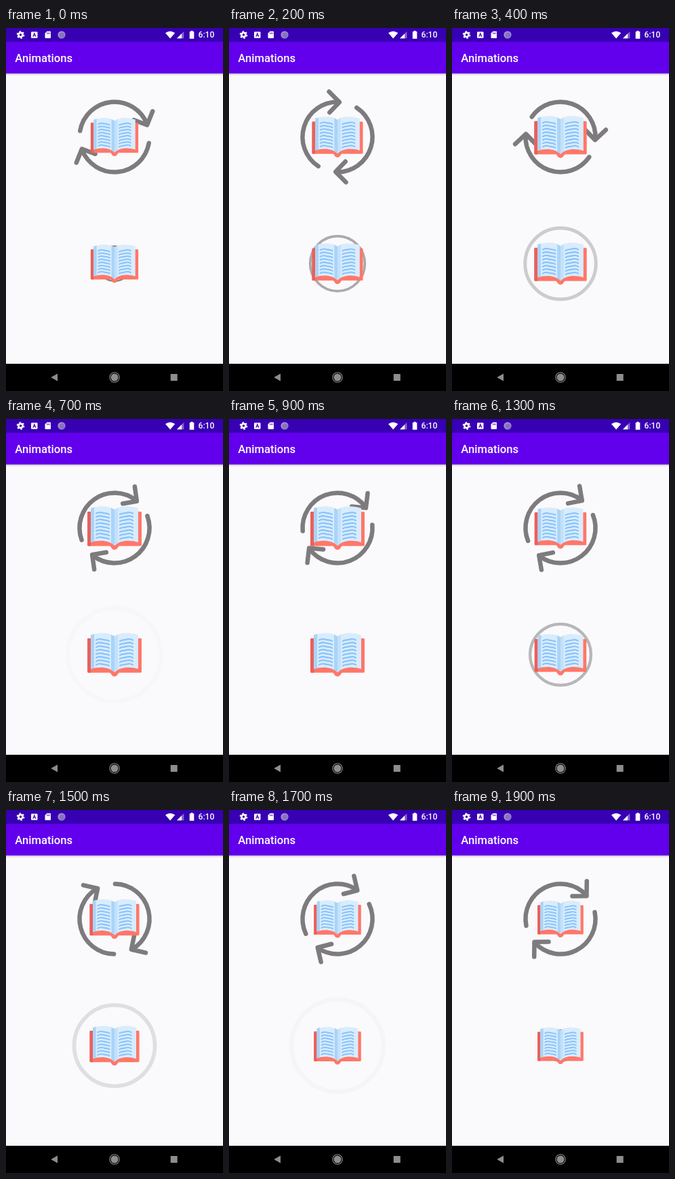
Animation, 320 px wide and 533 px high, one loop 2000 ms. Source, as an HTML page:

```html
<!DOCTYPE html>
<html lang="en">
<head>
<meta charset="utf-8">
<title>Animations</title>
<style>
  html, body { margin: 0; width: 100%; height: 100%; overflow: hidden; background: #faf9fb; }
  svg { display: block; width: 100%; height: 100%; }
  text { font-family: Roboto, sans-serif; font-weight: 500; fill: #fff; }
  .line { fill: none; stroke: #7d7b7e; stroke-linecap: round; stroke-linejoin: round; }
</style>
</head>
<body>
<svg viewBox="0 0 320 533">
  <defs>
    <linearGradient id="shade" x2="0" y2="1">
      <stop stop-color="#bdbbc2"/>
      <stop offset="1" stop-color="#faf9fb"/>
    </linearGradient>
    <g id="arrow" class="line" stroke-width="6.5">
      <path d="M-50.4 10.7A51.5 51.5 0 0 1 37.5 -35.3"/>
      <path d="M38 -56V-34.3L17 -33.8"/>
    </g>
    <g id="book">
      <path fill="#ff7769" d="M-38.5-24H38.5Q40-24 40-22.5V25Q40 26.5 38.5 26.5H7C5 27 4.5 32 0 32S-5 27-7 26.5H-38.5Q-40 26.5-40 25V-22.5Q-40-24-38.5-24Z"/>
      <path fill="#e9605c" d="M-38.5-24H-35V26.5H-38.5Q-40 26.5-40 25V-22.5Q-40-24-38.5-24Z"/>
      <path fill="#d9ecfc" d="M0-27C-8-33-22-33-35-29V21C-22 17-8 18 0 26C8 18 22 17 35 21V-29C22-33 8-33 0-27Z"/>
      <path fill="#a8d4f8" d="M-35-29L-30-30.4V19.6L-35 21ZM0-27L-5-29.6V22L0 26Z"/>
      <path fill="#c3e1fb" d="M0-27L5-29.6V22L0 26Z"/>
      <path id="lines" fill="none" stroke="#87c3fc" stroke-width="2.3" stroke-linecap="round"/>
    </g>
  </defs>

  <rect width="320" height="533" fill="#faf9fb"/>
  <rect y="66" width="320" height="4" fill="url(#shade)"/>
  <rect y="20" width="320" height="46.7" fill="#6200ee"/>
  <rect width="320" height="20.3" fill="#3700b3"/>
  <text x="13.3" y="50" font-size="16.67">Animations</text>

  <g fill="#fff">
    <circle cx="21.5" cy="10" r="3.1" fill="none" stroke="#fff" stroke-width="2.6"/>
    <circle cx="21.5" cy="10" r="4.9" fill="none" stroke="#fff" stroke-width="1.8" stroke-dasharray="2.4 2.73"/>
    <rect x="37" y="5.5" width="9.5" height="9.2" rx="1"/>
    <path d="M39.7 12.7L41.8 7.6L43.9 12.7M40.5 11H43.1" fill="none" stroke="#3700b3" stroke-width="1.1"/>
    <path d="M60.5 4.7H65Q66 4.7 66 5.7V14Q66 15 65 15H58.5Q57.5 15 57.5 14V7.8Z"/>
    <path d="M60.6 6.5V9M62.4 6.5V9M64.2 6.5V9" stroke="#3700b3" stroke-width=".8"/>
    <circle cx="82" cy="10" r="5.6" fill="#a08fcf"/>
    <circle cx="82.6" cy="10.6" r="4" fill="#8871c2"/>
    <path d="M235 7.3Q242 2.3 249.3 7.3L242.1 15.5Z"/>
    <path d="M262.3 5V15.2H252Z" fill-opacity=".4"/>
    <path d="M259 8.3V15.2H252Z"/>
    <path d="M272.6 4H275.4V5.2H277.3V15.8H270.7V5.2H272.6Z"/>
  </g>
  <text x="283.6" y="14.2" font-size="12">6:10</text>

  <g transform="translate(160 160)">
    <g id="arrows">
      <use href="#arrow"/>
      <use href="#arrow" transform="rotate(180)"/>
    </g>
    <use href="#book" class="book"/>
  </g>
  <g transform="translate(160 346)">
    <circle id="ring" class="line"/>
    <use href="#book" class="book"/>
  </g>

  <rect y="493" width="320" height="40"/>
  <g fill="#8d8d8d">
    <path d="M66.3 513L76 507.4V518.6Z"/>
    <circle cx="160" cy="513" r="5.5"/>
    <circle cx="160" cy="513" r="7.2" fill="none" stroke="#8d8d8d" stroke-width="1.1"/>
    <rect x="242.7" y="508" width="10" height="10"/>
  </g>
</svg>
<script>
const $ = id => document.getElementById(id);
const books = document.querySelectorAll('.book');
const LOOP = 2000, STEP = 100;

// [time in ms, turns completed]
const pace = [[0, .159], [200, .42], [400, .584], [700, .905], [1100, 1.272],
              [1500, 1.694], [1800, 1.97], [1900, 2.03], [2000, 2.16]];

let rows = '';
for (let i = 0; i < 8; i++) {
  const y = -21.5 + i * 5.2;
  rows += `M-27 ${y}c5-3 8-1 11-.5s6 .3 8 2M8 ${y + 1.5}c2-1.7 5-1.5 8-2s6-2.500 11 .5`;
}
$('lines').setAttribute('d', rows);

function turnsAt(t) {
  const i = pace.findIndex(([time]) => time > t);
  const [t0, a] = pace[i - 1], [t1, b] = pace[i];
  return a + (b - a) * (t - t0) / (t1 - t0);
}

function draw(t) {
  const turns = turnsAt(t);
  const ease = .5 - .5 * Math.cos(Math.PI * (turns % 1));
  $('arrows').setAttribute('transform', `rotate(${360 * ease})`);

  const radius = 23.8 + 49 * ease;
  $('ring').setAttribute('r', radius * .955);
  $('ring').setAttribute('stroke-width', radius * .09);
  $('ring').setAttribute('opacity', 1 - ease);

  const scale = (67 + 13 * Math.abs(Math.sin(Math.PI * turns / 2))) / 80;
  books.forEach(book => book.setAttribute('transform', `scale(${scale})`));
}

const start = performance.now();
function tick() {
  const t = (performance.now() - start) % LOOP;
  draw(Math.floor(t / STEP) * STEP);
  requestAnimationFrame(tick);
}
tick();
</script>
</body>
</html>
```
